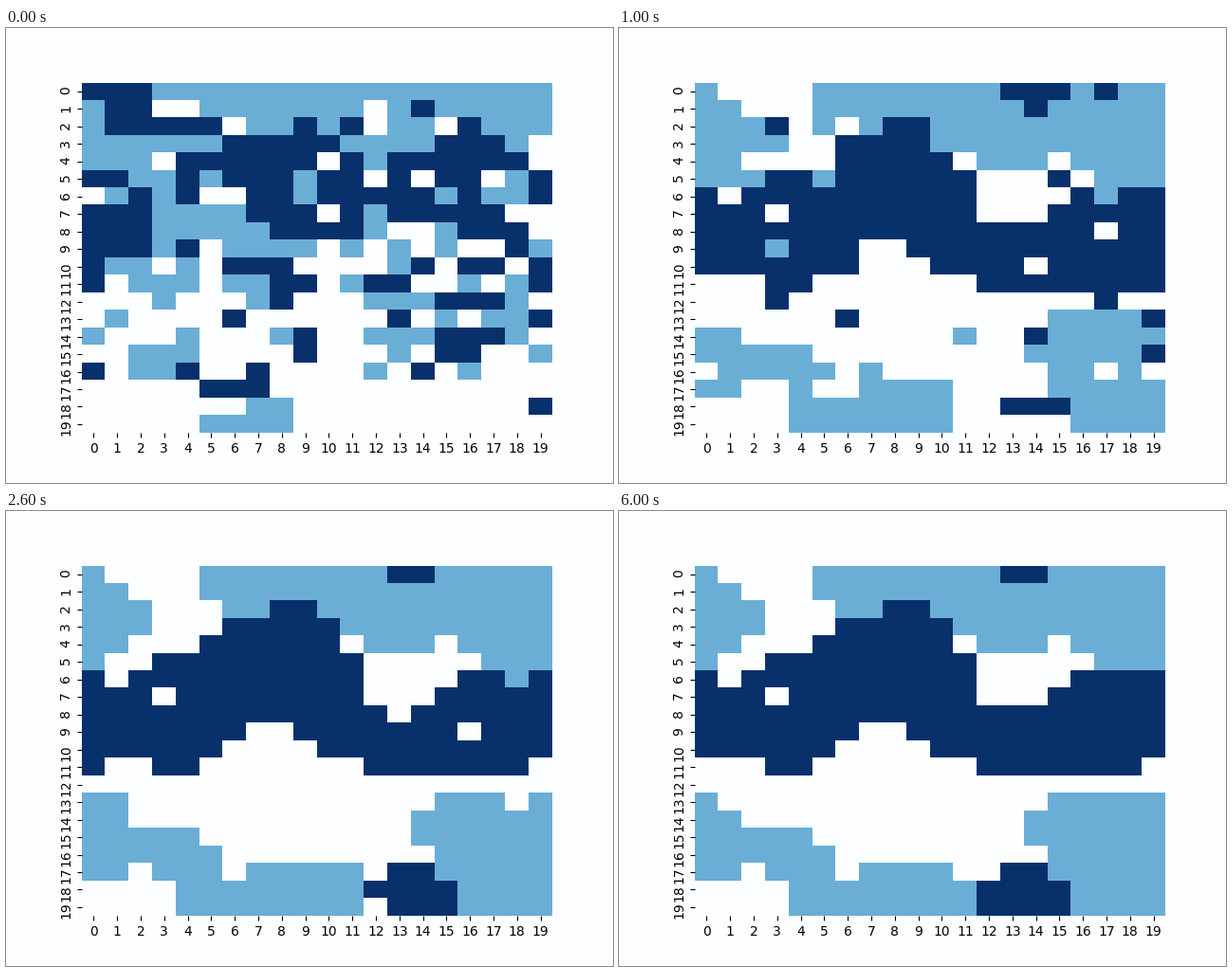
Animation, 640 px wide and 480 px high, one loop 10 s. Source, as a matplotlib script:

```python
import numpy as np
import matplotlib.pyplot as plt
from matplotlib.animation import FuncAnimation
from matplotlib.colors import ListedColormap

N = 20
STEP_MS = 200
FRAMES = 50
LAST = 30  # the pattern is at rest from here on
PAPER, LIGHT, DARK = 0, 1, 2
COLOURS = ["#fcfeff", "#6aaed6", "#08306b"]


def paint(grid, shade, *boxes):
    """Fill boxes given as (col, row[, width[, height]])."""
    for x, y, *size in boxes:
        w, h = (size + [1, 1])[:2] if len(size) != 1 else (size[0], 1)
        grid[y:y + h, x:x + w] = shade


def settled():
    g = np.full((N, N), PAPER)
    paint(g, LIGHT,
          (5, 0, 15, 3), (11, 3, 9, 2), (17, 5, 3), (0, 0, 1, 6),
          (1, 1, 1, 4), (2, 2, 1, 2), (0, 13, 1, 5), (1, 14, 1, 4),
          (2, 15, 3, 3), (5, 16, 1, 2), (7, 17, 4), (4, 18, 8, 2),
          (15, 13, 5, 7), (14, 14, 1, 2))
    paint(g, DARK,
          (0, 8, 20, 3), (2, 6, 10, 2), (3, 5, 9), (5, 4, 6), (6, 3, 5),
          (8, 2, 2), (0, 6, 1, 2), (1, 7), (16, 6, 4), (15, 7, 5),
          (3, 11, 2), (12, 11, 7), (13, 17, 2), (12, 18, 4, 2), (13, 0, 2))
    paint(g, PAPER,
          (5, 2), (11, 4), (15, 4), (3, 7), (7, 9, 2), (6, 10, 4), (2, 17))
    return g


def disorder(rng):
    """Random shades, paler towards the bottom, around some larger patches."""
    depth = np.linspace(0, 1, N)[:, None]
    u = rng.random((N, N))
    white = 0.1 + 0.7 * depth
    g = np.where(u < white, PAPER, np.where(u < (1 + white) / 2, LIGHT, DARK))
    paint(g, LIGHT,
          (5, 0, 5, 2), (15, 0, 5, 2), (17, 2, 3), (0, 3, 4), (0, 4, 3),
          (12, 3, 3), (3, 7, 4, 2), (6, 9, 4), (12, 12, 3), (5, 19, 4))
    paint(g, DARK,
          (1, 0, 2, 3), (6, 3, 4, 2), (6, 5, 3), (7, 6, 2, 2), (13, 4, 6),
          (0, 7, 3, 2), (13, 7, 5), (8, 8, 4), (11, 6, 3), (15, 12, 3))
    paint(g, PAPER, (10, 17, 9, 3), (0, 17, 2, 2), (2, 13, 3), (7, 13, 4))
    return g


def flicker(grid, rate, rng):
    """Some cells take a neighbour's shade on the torus, or any shade."""
    near = [np.roll(grid, s, axis) for s in (1, -1) for axis in (0, 1)]
    near.append(rng.integers(3, size=grid.shape))
    pick = np.choose(rng.integers(5, size=grid.shape), near)
    return np.where(rng.random(grid.shape) < rate, pick, grid)


def anneal(rng):
    start, end = disorder(rng), settled()
    settle = rng.exponential(2.5, size=(N, N))
    states = [start]
    for i in range(1, LAST):
        g = np.where(settle < i, end, start)
        states.append(flicker(g, 0.4 * np.exp(-i / 6) + 0.02, rng))
    return states + [end]


STATES = anneal(np.random.default_rng(7))

fig, ax = plt.subplots(figsize=(6.4, 4.8), dpi=100, facecolor=COLOURS[PAPER])
ax.set_facecolor(COLOURS[PAPER])
# the small shift makes cell edges snap down to whole pixels
edges = np.arange(N + 1)
mesh = ax.pcolormesh(edges - 0.016, edges - 0.026, STATES[0],
                     cmap=ListedColormap(COLOURS), vmin=0, vmax=2)
ax.set(xlim=(0, N), ylim=(N, 0))
ax.spines[:].set_visible(False)
ticks = np.arange(N)
ax.set_xticks(ticks + 0.5, ticks)
ax.set_yticks(ticks + 0.5, ticks, rotation="vertical")


def update(i):
    mesh.set_array(STATES[min(i, LAST)])
    return [mesh]


anim = FuncAnimation(fig, update, frames=FRAMES, interval=STEP_MS,
                     init_func=lambda: update(0), repeat=True, repeat_delay=0)
plt.show()
```
